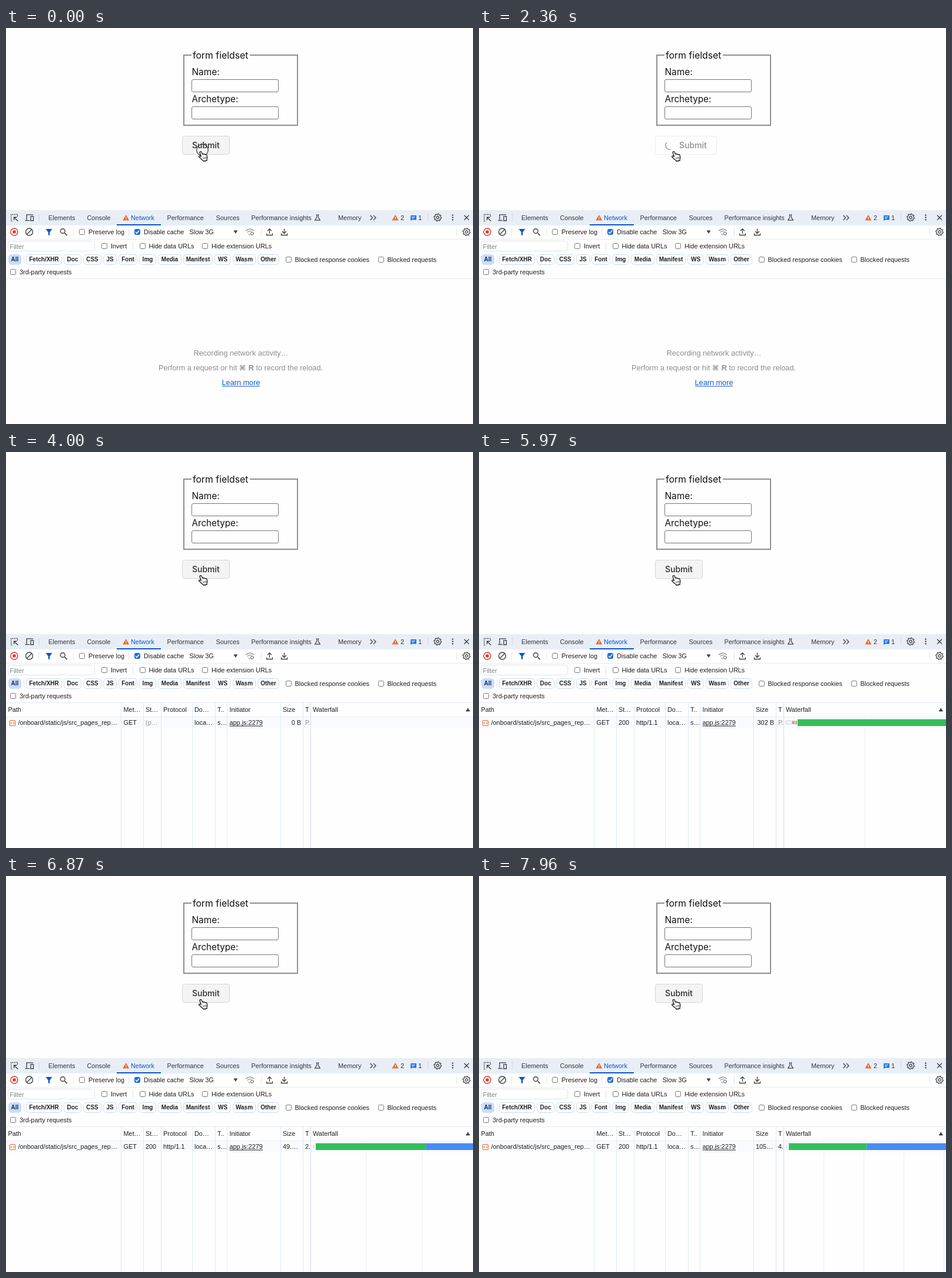
An HTML page with a canvas that plays this animation: 793 by 672 pixels, repeating every 8000 ms.

```html
<!DOCTYPE html>
<html lang="en">
<head>
<meta charset="utf-8">
<title>Form submit with network panel</title>
<style>
  html, body { margin: 0; width: 100%; height: 100%; overflow: hidden; background: #fefefe; }
  canvas { display: block; }
</style>
</head>
<body>
<canvas id="stage" width="793" height="672"></canvas>
<script>
const W = 793, H = 672, LOOP = 8000;
const ctx = document.getElementById('stage').getContext('2d');
const SANS = '"Liberation Sans", Arial, sans-serif';
const UI = '10.9px ' + SANS;
const BOLD = 'bold 10px ' + SANS;
const MSG = '12.7px ' + SANS;
const INK = '#1f1f1f', ICON = '#3c4043', BLUE = '#0b57d0', ORANGE = '#e8692c';

// Times in ms
const CLICK_END = 60, LOAD_START = 920, LOAD_END = 3760, REQUEST = 3940, RESPONSE = 5970, DATA = 6025;

function text(s, x, y, color = INK, font = UI, align = 'left') {
  ctx.font = font;
  ctx.fillStyle = color;
  ctx.textAlign = align;
  ctx.fillText(s, x, y);
}
function rect(x, y, w, h, color) {
  ctx.fillStyle = color;
  ctx.fillRect(x, y, w, h);
}
const vline = (x, y, y2, color) => rect(x, y, 1, y2 - y, color);
function box(x, y, w, h, r, fill, stroke, lw = 1) {
  ctx.beginPath();
  ctx.roundRect(x + 0.5, y + 0.5, w - 1, h - 1, r);
  if (fill) { ctx.fillStyle = fill; ctx.fill(); }
  if (stroke) { ctx.strokeStyle = stroke; ctx.lineWidth = lw; ctx.stroke(); }
}
function stroke(path, color = ICON, lw = 1.3) {
  ctx.strokeStyle = color;
  ctx.lineWidth = lw;
  ctx.stroke(new Path2D(path));
}
function fill(path, color = ICON) {
  ctx.fillStyle = color;
  ctx.fill(new Path2D(path));
}
function circle(x, y, r, color, lw) {
  ctx.beginPath();
  ctx.arc(x, y, r, 0, Math.PI * 2);
  if (lw) { ctx.strokeStyle = color; ctx.lineWidth = lw; ctx.stroke(); }
  else { ctx.fillStyle = color; ctx.fill(); }
}
function gear(x, y) {
  ctx.beginPath();
  for (let i = 0; i < 32; i++) {
    const a = (i + 0.5) * Math.PI / 16;
    const r = i % 4 < 2 ? 6.3 : 4.9;
    ctx.lineTo(x + r * Math.cos(a), y + r * Math.sin(a));
  }
  ctx.closePath();
  ctx.strokeStyle = ICON;
  ctx.lineWidth = 1.2;
  ctx.stroke();
  circle(x, y, 2.1, ICON, 1.2);
}
function warning(x, y) {
  fill(`M${x} ${y - 5}l5.5 9.6h-11z`, ORANGE);
  rect(x - 0.5, y - 1.5, 1.1, 3, '#fff');
  rect(x - 0.5, y + 2.3, 1.1, 1.1, '#fff');
}
function check(x, y, label, labelX, on) {
  box(x, y, 10, 10, 2, on ? '#1a6ee0' : '#fff', on ? '#1a6ee0' : '#747775');
  if (on) stroke(`M${x + 2} ${y + 5}l2.2 2.3l4 -4.8`, '#fff', 1.5);
  text(label, labelX, y + 9);
}

function drawForm() {
  const edge = '#8f8f8f';
  ctx.strokeStyle = edge;
  ctx.lineWidth = 2;
  ctx.strokeRect(302, 46, 193, 119);
  rect(315, 43, 99, 6, '#fefefe');
  text('form fieldset', 317, 52, '#111', '15.8px Inter, sans-serif');
  text('Name:', 315.5, 80, '#111', '15.4px Inter, sans-serif');
  text('Archetype:', 315.5, 126, '#111', '15.2px Inter, sans-serif');
  for (const y of [87, 133]) box(315, y, 148, 22, 2.5, '#fff', '#767676');
}

const ease = u => { u = Math.min(1, Math.max(0, u)); return 1 - (1 - u) ** 3; };

function drawButton(t) {
  const loading = t >= LOAD_START && t < LOAD_END;
  const open = t < LOAD_END ? ease((t - LOAD_START) / 290) : 1 - ease((t - LOAD_END) / 250);
  const shift = 24 * open;
  const ink = loading ? '#8e8e8e' : '#2c2c2c';
  box(299, 183, 81 + shift, 32, 3.5, loading ? '#fefefe' : '#f4f4f4', loading ? '#ededed' : '#d6d6d6');
  if (open > 0.01) {
    const mid = (126 + 0.3726 * (t - 1330)) * Math.PI / 180;
    ctx.globalAlpha = open;
    ctx.beginPath();
    ctx.arc(324.2, 199, 7.4, mid - 1.15, mid + 1.15);
    ctx.strokeStyle = ink;
    ctx.lineWidth = 1.4;
    ctx.lineCap = 'round';
    ctx.stroke();
    ctx.lineCap = 'butt';
    ctx.globalAlpha = 1;
  }
  text('Submit', 316 + shift, 204, ink, '500 14px Inter, sans-serif');
}

function drawCursor(t) {
  if (t < CLICK_END) {
    circle(333.5, 207, 9.8, '#333', 1.2);
  }
  const hand = 'M329.2 210.6c.8 -1.4 2.5 -1.1 3.1 .3l1.4 3.4c.6 -1 1.9 -.8 2.4 .2c.8 -.8 2 -.5 2.4 .5' +
    'c1.1 -.7 2.3 0 2.6 1.2l.6 3c.3 1.6 -.5 3 -.8 4.2l.2 1.6l-6 1l-.6 -1.3c-1.8 -.8 -3.6 -3 -5.2 -4.4' +
    'c-1.3 -1.1 -2.2 -2 -1.4 -2.8c.8 -.8 2.2 -.2 3.4 .8l-2 -6.2z';
  fill(hand, '#fff');
  ctx.lineJoin = 'round';
  stroke(hand, '#111', 1.3);
  stroke('M335 219.5l.7 3M337.2 219l.6 3M339.3 218.6l.5 3', '#111', 0.8);
  ctx.lineJoin = 'miter';
}

function drawTabs() {
  rect(0, 309, W, 26, '#e9eef6');
  // Inspect and device icons
  ctx.setLineDash([2, 1.5]);
  stroke('M19.5 320V316.5H8.7V327.3H12', ICON, 1.3);
  ctx.setLineDash([]);
  stroke('M13.6 326v-4.8h4.8M14 321.6l6.4 6.2', ICON, 1.4);
  stroke('M46 316.8H35v9M32.5 326.6h7.5M42 319.6h4.5v7.4H42z');
  vline(56, 315, 329, '#d0dcef');
  const tabs = [['Elements', 72], ['Console', 137.5], ['Performance', 273.5], ['Sources', 356.5],
    ['Performance insights', 416.5], ['Memory', 564]];
  for (const [s, x] of tabs) text(s, x, 325.5, '#303438');
  warning(203.7, 322);
  text('Network', 212, 325.5, BLUE);
  rect(188, 333, 75, 2, BLUE);
  stroke('M526.5 317h5M527.7 317v4l-3 5.2h8.6l-3 -5.2v-4', ICON, 1.2);
  stroke('M618.5 318l4 4l-4 4M624 318l4 4l-4 4');
  warning(661, 322);
  text('2', 670, 325.5, '#303438');
  fill('M687.2 318h9.6v7.4h-7.4l-2.2 2z', '#1a6ee0');
  stroke('M689 320.6h6M689 322.9h4', '#fff', 1);
  text('1', 700, 326, '#303438');
  vline(716, 315, 329, '#d0dcef');
  gear(733, 321.5);
  for (const y of [317.5, 321.5, 325.5]) circle(758.5, y, 1.2, ICON);
  stroke('M778 317.8l8 8M786 317.8l-8 8', ICON, 1.4);
}

function drawToolbar() {
  const rule = '#dbe5f4';
  circle(14, 346, 6, '#dc362e', 1.4);
  box(11, 343, 6, 6, 1, '#dc362e');
  circle(39.5, 346, 6, ICON, 1.4);
  stroke('M35.3 350.2l8.4 -8.4', ICON, 1.4);
  vline(55, 340, 352, rule);
  fill('M67.5 341h11l-4.2 5.4v5h-2.6v-5z', BLUE);
  circle(96.3, 344.6, 3.9, ICON, 1.4);
  stroke('M99.2 347.5l4.6 4.6', ICON, 1.5);
  vline(114, 340, 352, rule);
  check(124, 341, 'Preserve log', 140, false);
  vline(208, 340, 352, rule);
  check(218, 341, 'Disable cache', 234, true);
  text('Slow 3G', 311.5, 350);
  fill('M386.4 343.5h7l-3.5 5.4z');
  // Network conditions
  const pale = '#85898d';
  stroke('M407 344.2q7 -6.2 14 0M409.6 346.8q4 -3.4 7.2 -1.8M412 349.3l2 2.2', pale, 1.2);
  circle(417.8, 348.7, 2.3, pale, 1.4);
  vline(433, 340, 352, rule);
  stroke('M447.5 349v-8M444 344.3l3.5 -3.5l3.5 3.5M442.5 348.5v3h10v-3');
  stroke('M472.5 340.5v8M469 345l3.5 3.5l3.5 -3.5M467.5 348.5v3h10v-3');
  vline(765, 340, 352, rule);
  gear(782, 346);
  rect(0, 358, W, 1, '#e6edf8');
}

function drawFilters() {
  box(3, 361, 148, 18, 4, '#fff', '#dde4ee');
  text('Filter', 6.5, 374.5, '#80868b');
  check(162, 365, 'Invert', 178, false);
  vline(215, 363, 377, '#dbe5f4');
  check(227, 365, 'Hide data URLs', 242.5, false);
  check(333, 365, 'Hide extension URLs', 349, false);
  const pills = [['All', 4, 26], ['Fetch/XHR', 34, 95], ['Doc', 98, 128], ['CSS', 131, 162], ['JS', 165, 188],
    ['Font', 191, 223], ['Img', 226, 255], ['Media', 258, 298], ['Manifest', 301, 351], ['WS', 354, 382],
    ['Wasm', 385, 424], ['Other', 427, 464]];
  for (const [s, x, x2] of pills) {
    const on = s === 'All';
    box(x, 384, x2 - x, 18, 5, on ? '#c9defc' : '#fff', on ? '#c9defc' : '#cbdaf3');
    text(s, (x + x2) / 2, 396.3, on ? '#12305f' : INK, BOLD, 'center');
  }
  vline(30, 386, 400, '#dbe5f4');
  check(475, 388, 'Blocked response cookies', 490.5, false);
  check(632, 388, 'Blocked requests', 647.5, false);
  check(7, 409, '3rd-party requests', 23, false);
  rect(0, 425, W, 1, '#e3eaf5');
}

function drawEmpty() {
  const gray = '#8a8d91';
  text('Recording network activity…', 399, 556, gray, MSG, 'center');
  text('Perform a request or hit', 259, 581.3, gray, MSG);
  text('⌘', 396, 581.3, gray, 'bold 12px "DejaVu Sans", sans-serif');
  text('R', 421, 581.3, gray, 'bold ' + MSG, 'right');
  text('to record the reload.', 538, 581.3, gray, MSG, 'right');
  text('Learn more', 399, 606.3, BLUE, MSG, 'center');
  rect(367, 607.5, 64, 1, BLUE);
}

function sizeLabel(t) {
  const s = (t - 6430) / 1000;
  const kb = 25.9 + 53.5 * s - s * s;
  if (kb < 10) return kb.toFixed(1) + ' …';
  return Math.floor(kb) + (kb < 100 ? '.…' : '…');
}

function drawWaterfall(t) {
  const x0 = 518, span = 1.985 + 1.035 * (t - RESPONSE) / 1000;
  const second = 275 / span;
  for (let x = x0 + second; x < W; x += second) vline(Math.round(x) - 1, 450, H, '#eaeff7');
  const green = '#35bd5c';
  if (t < DATA) {
    box(521, 456, 11, 6, 0, '#fff', '#c8cbd0');
    rect(532, 456, 4, 6, '#adb0b4');
    rect(537, 456, 3, 6, '#f0a030');
    rect(541, 453.5, W - 541, 11.5, green);
    return;
  }
  const split = x0 + 2.07 * second;
  rect(522, 457, 1, 5, '#c8cbd0');
  rect(526, 453.5, split - 526, 11.5, green);
  rect(split, 453.5, W - split, 11.5, '#468cf5');
}

function drawTable(t) {
  const answered = t >= RESPONSE, data = t >= DATA;
  rect(0, 450, W, 19, '#f8fafe');
  if (answered) drawWaterfall(t);
  for (const x of [195, 233, 263, 316, 355, 375, 466, 504]) vline(x, 426, H, '#dfe9f8');
  vline(517, 426, H, '#d3dced');
  rect(0, 449, W, 1, '#e6edf8');

  const heads = [['Path', 3.5], ['Met…', 199.5], ['St…', 237], ['Protocol', 267], ['Do…', 320], ['T..', 359],
    ['Initiator', 379.5], ['Size', 470], ['T', 508], ['Waterfall', 521]];
  for (const [s, x] of heads) text(s, x, 441.3);
  fill('M780.5 440.3h7.6l-3.8 -6z');

  box(6, 455, 10, 10, 1.5, '#fff', ORANGE, 1.2);
  stroke('M10 458l-1.8 2l1.8 2M12 458l1.8 2l-1.8 2', ORANGE, 1);
  const y = 463.3, dim = '#8f9296';
  text('/onboard/static/js/src_pages_rep…', 20.5, y);
  text('GET', 199.5, y);
  text(answered ? '200' : '(p…', 237, y, answered ? INK : dim);
  if (answered) text('http/1.1', 267, y);
  text('loca…', 320, y);
  text('s…', 359, y);
  text('app.js:2279', 379.5, y);
  rect(379.5, 464.5, 56.5, 1, INK);
  if (data) text(sizeLabel(t), 470, y);
  else text(answered ? '302 B' : '0 B', 501, y, INK, UI, 'right');
  const secs = Math.floor(1.985 + 1.035 * (t - RESPONSE) / 1000);
  text(data ? Math.max(2, secs) + '.' : 'P.', 508, y, data ? INK : dim);
}

function draw(t) {
  rect(0, 0, W, H, '#fefefe');
  drawForm();
  drawButton(t);
  drawCursor(t);
  drawTabs();
  drawToolbar();
  drawFilters();
  if (t < REQUEST) drawEmpty();
  else drawTable(t);
}

function tick() {
  draw(performance.now() % LOOP);
  requestAnimationFrame(tick);
}
tick();
</script>
</body>
</html>
```
